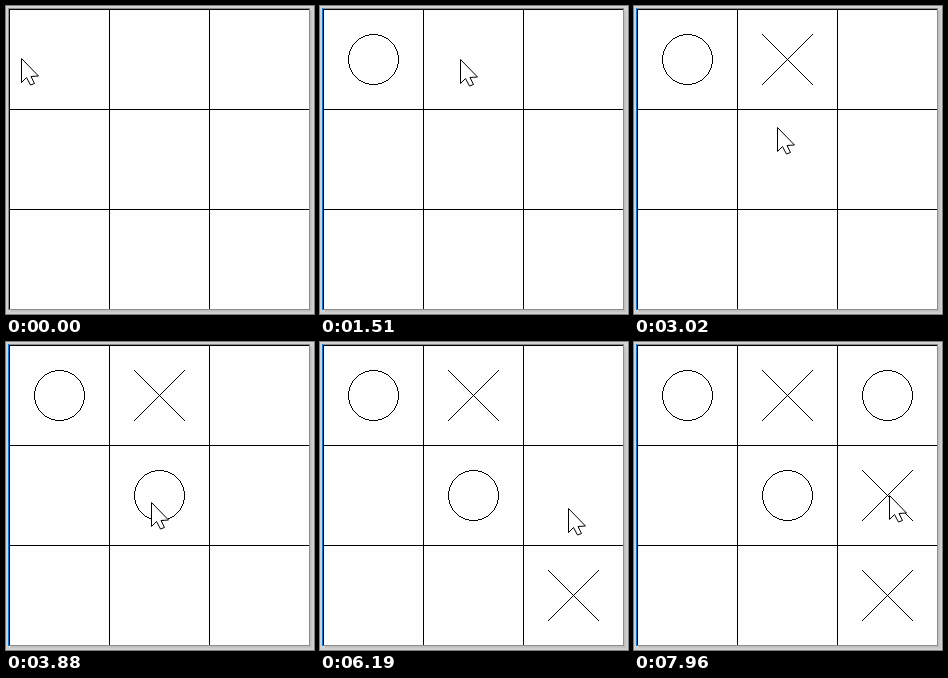
An HTML page with a canvas for the animation above (8000 ms loop, 308 by 308 pixels).

```html
<!DOCTYPE html>
<html lang="en">
<head>
<meta charset="utf-8">
<title>Tic-tac-toe</title>
<style>
  html, body { margin: 0; width: 100%; height: 100%; overflow: hidden; }
  canvas { display: block; width: 308px; height: 308px; }
</style>
</head>
<body>
<canvas id="board" width="308" height="308"></canvas>
<script>
const ctx = document.getElementById('board').getContext('2d');
const LOOP = 8000, CELL = 100, FOCUS_AT = 460;

const easeIn = p => p ** 1.5;
const easeOut = p => 1 - (1 - p) ** 1.5;
const easeOutQuad = p => 1 - (1 - p) ** 2;
const smooth = p => p * p * (3 - 2 * p);

// Pointer moves; bend bows the path sideways.
const home = { x: 15, y: 52 };
const moves = [
  { start: 50, end: 210, steps: 5, x: 45, y: 61, ease: smooth },
  { start: 1000, end: 1760, steps: 20, x: 153, y: 52, ease: easeOutQuad },
  { start: 1890, end: 1890, steps: 1, x: 157, y: 52, ease: smooth },
  { start: 2590, end: 3340, steps: 22, x: 145, y: 160, ease: smooth, bend: -7 },
  { start: 4070, end: 4410, steps: 8, x: 236, y: 255, ease: smooth },
  { start: 5490, end: 6270, steps: 16, x: 251, y: 146, ease: easeIn },
  { start: 6300, end: 6980, steps: 15, x: 274, y: 57, ease: easeOut, bend: 1 },
  { start: 7290, end: 7660, steps: 11, x: 255, y: 153, ease: smooth }
];

const turns = [
  { press: 430, mark: 500, release: 600, col: 0, row: 0 },
  { press: 2170, mark: 2200, release: 2330, col: 1, row: 0 },
  { press: 3700, mark: 3730, release: 3880, col: 1, row: 1 },
  { press: 4800, mark: 4830, release: 4930, col: 2, row: 2 },
  { press: 7110, mark: 7140, release: 7260, col: 2, row: 0 },
  { press: 7870, mark: 7870, release: 7960, col: 2, row: 1 }
];

function rect(color, x, y, w, h) {
  ctx.fillStyle = color;
  ctx.fillRect(x, y, w, h);
}

function pointerAt(t) {
  let { x, y } = home;
  for (const m of moves) {
    if (t < m.start) break;
    const gap = (m.end - m.start) / Math.max(1, m.steps - 1);
    const step = gap ? Math.floor((t - m.start) / gap + 1e-6) + 1 : 1;
    const p = m.ease(Math.min(1, step / m.steps));
    x += (m.x - x) * p + (m.bend || 0) * Math.sin(Math.PI * p);
    y += (m.y - y) * p;
  }
  return { x: Math.round(x), y: Math.round(y) };
}

function drawWindow(focused) {
  rect('#d2d2d2', 0, 0, 308, 308);
  rect('#8c8c8c', 2, 2, 302, 302);
  rect('#fefefe', 3, 3, 300, 300);
  for (let i = 0; i < 4; i++) {
    const shade = 190 + i * 7;
    const gray = `rgb(${shade},${shade},${shade})`;
    rect(gray, 304 + i, 5, 1, 300 + i);
    rect(gray, 5, 304 + i, 300 + i, 1);
  }
  if (focused) rect('#0078d7', 2, 2, 1, 302);
  for (let i = 0; i < 3; i++) {
    rect('#000', 3 + i * CELL, 3, 1, 300);
    rect('#000', 3, 3 + i * CELL, 300, 1);
  }
}

const dot = (x, y) => ctx.fillRect(x, y, 1, 1);

function drawCross(cx, cy) {
  for (let i = -25; i <= 25; i++) {
    dot(cx + i, cy + i);
    dot(cx + i, cy - i);
  }
}

function drawNought(cx, cy) {
  for (let a = 0; a <= 18; a++) {
    const b = Math.round(Math.sqrt(625 - a * a));
    if (b < a) break;
    for (const sx of [-1, 1]) {
      for (const sy of [-1, 1]) {
        dot(cx + sx * a, cy + sy * b);
        dot(cx + sx * b, cy + sy * a);
      }
    }
  }
}

function drawClick({ x, y }) {
  ctx.fillStyle = 'rgba(255,255,0,0.47)';
  ctx.beginPath();
  ctx.arc(x + 1.5, y + 1.5, 10.2, 0, 2 * Math.PI);
  ctx.fill();
}

function drawPointer({ x, y }) {
  const outline = [[0, 0], [0, 24], [5, 19], [9, 26.5], [13, 25], [9.5, 18], [17, 17.5]];
  ctx.beginPath();
  for (const [dx, dy] of outline) ctx.lineTo(x + dx + 0.5, y + dy + 0.5);
  ctx.closePath();
  ctx.fillStyle = '#fff';
  ctx.fill();
  ctx.strokeStyle = '#000';
  ctx.lineWidth = 1;
  ctx.lineJoin = 'round';
  ctx.stroke();
}

function draw(now) {
  const t = now % LOOP;
  const pointer = pointerAt(t);
  drawWindow(t >= FOCUS_AT);
  ctx.fillStyle = '#000';
  turns.forEach(({ mark, col, row }, i) => {
    if (t < mark) return;
    const drawMark = i % 2 ? drawCross : drawNought;
    drawMark(53 + col * CELL, 53 + row * CELL);
  });
  if (turns.some(({ press, release }) => t >= press && t < release)) drawClick(pointer);
  drawPointer(pointer);
}

let origin;
function tick(now) {
  origin ??= now;
  draw(now - origin);
  requestAnimationFrame(tick);
}
draw(0);
requestAnimationFrame(tick);
</script>
</body>
</html>
```
